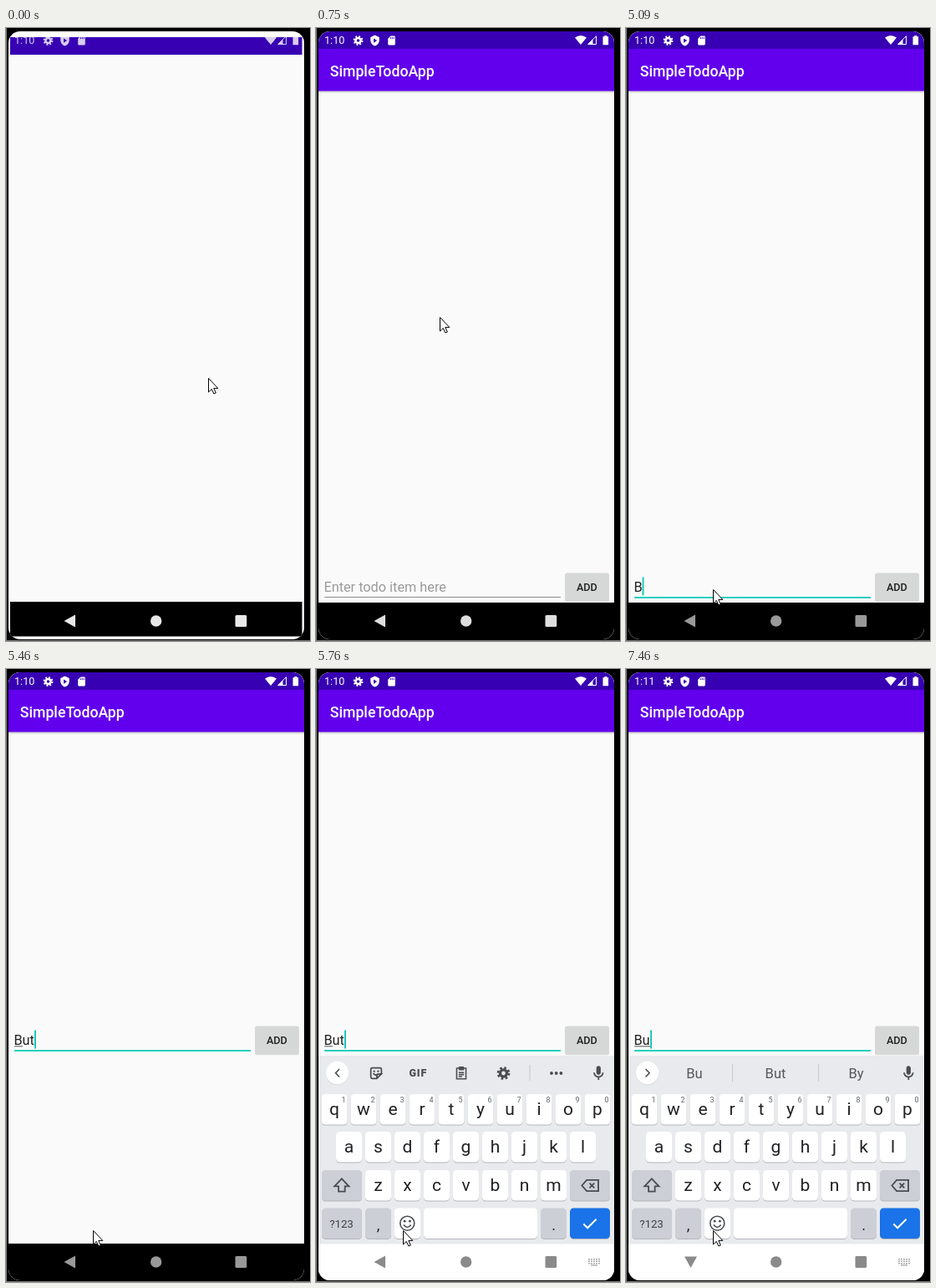
An HTML page that plays this animation: 364x734 px, repeating every 8000 ms.

```html
<!DOCTYPE html>
<html lang="en">
<head>
<meta charset="utf-8">
<title>Todo app</title>
<style>
  html, body { margin: 0; width: 100%; height: 100%; overflow: hidden; background: #000; }
  svg { display: block; width: 364px; height: 734px; }
  text { font-family: Roboto, Arial, sans-serif; white-space: pre; }
</style>
</head>
<body>
<svg id="stage" viewBox="0 0 364 734" xmlns="http://www.w3.org/2000/svg"></svg>
<script>
const LOOP = 8000;
const INK = '#202124', ICON = '#4a4d51', KEY_DARK = '#cccfd5';

const rect = (x, y, w, h, fill, more = '') =>
  `<rect x="${x}" y="${y}" width="${w}" height="${h}" fill="${fill}" ${more}/>`;
const circle = (x, y, r, fill, more = '') =>
  `<circle cx="${x}" cy="${y}" r="${r}" fill="${fill}" ${more}/>`;
const label = (x, y, size, fill, str, more = '') =>
  `<text x="${x}" y="${y}" font-size="${size}" fill="${fill}" ${more}>${str}</text>`;
const mid = 'text-anchor="middle"';
const group = (id, body, more = '') => `<g id="${id}" ${more}>${body}</g>`;
// Icons are drawn on a 24-unit grid centred on x, y.
const icon = (x, y, size, body) =>
  `<g transform="translate(${x - size / 2} ${y - size / 2}) scale(${size / 24})">${body}</g>`;
const line = (d, color, width = 2) =>
  `<path d="${d}" fill="none" stroke="${color}" stroke-width="${width}"/>`;
const shape = (d, fill) => `<path d="${d}" fill="${fill}"/>`;

function gear(x, y, size, color) {
  const tooth = Math.PI * 17 / 16;
  return icon(x, y, size,
    circle(12, 12, 5.4, 'none', `stroke="${color}" stroke-width="4.4"`) +
    circle(12, 12, 8.5, 'none', `stroke="${color}" stroke-width="4" stroke-dasharray="${tooth}"`));
}

function statusBar() {
  return label(10, 19.3, 12.6, '#fff', '1:10', 'id="clock"') +
    gear(50.5, 15, 13.5, '#fff') +
    icon(70.5, 15, 14, shape('M12 1L3 5v6c0 5.6 3.8 10.700 9 12c5.200-1.300 9-6.400 9-12V5z', '#fff') +
      shape('M9.500 7.500v9l7-4.500z', '#3700b3')) +
    icon(90.500, 15, 13, shape('M18 2h-8L4 8v12q0 2 2 2h12q2 0 2-2V4q0-2-2-2z', '#fff') +
      line('M10 4.500v4M13.500 4.500v4M17 4.500v4', '#3700b3', 1.600)) +
    shape('M310 11.500Q317 6.500 324 11.500L317 20Z', '#fff') +
    line('M335.500 9.700V19.500H325.700Z', '#fff', 1) + shape('M331.500 13.500V19.500H325.500Z', '#fff') +
    shape('M343.500 10.300h1.800v-1.300h3v1.300h1.800v9.900h-6.600z', '#fff');
}

function inputRow() {
  return rect(10, 681, 283, 1, '#8c8c8c', 'id="line"') +
    label(9.4, 675, 16.3, '#9a9a9a', 'Enter todo item here', 'id="field"') +
    rect(10, 676.3, 10, 1, '#555', 'id="mark"') +
    rect(20, 657.5, 2, 22, '#1cc9b8', 'id="caret"') +
    rect(298, 653, 53, 34.200, '#000', 'rx="2" opacity=".13"') +
    rect(298.500, 652.500, 52, 33.500, '#d6d7d7', 'rx="2"') +
    label(324.300, 673.500, 12.600, '#202020', 'ADD', mid + ' font-weight="500"');
}

function key(x, y, w, fill = '#fff') {
  return rect(x, y + 1, w, 36.500, '#b4b7bc', 'rx="4.500"') + rect(x, y, w, 36.500, fill, 'rx="4.500"');
}

function letters(str, first, y, digits = '') {
  return [...str].map((ch, i) => {
    const x = first + 35 * i;
    return key(x - 15.5, y, 31) + label(x, y + 24.5, 21, INK, ch, mid) +
      (digits ? label(x + 11, y + 10.3, 9, '#5f6368', digits[i], mid) : '');
  }).join('');
}

function toolbar() {
  return line('M28 479L23.500 483.700L28 488.500', ICON, 1.600) +
    icon(72, 484, 19, line('M20 13V6q0-2-2-2H6q-2 0-2 2v12q0 2 2 2h7l7-7h-4q-3 0-3 3v4M8 12q2 4 5 2', ICON, 2.200) +
      circle(9, 9, 1.500, ICON) + circle(15, 9, 1.500, ICON)) +
    label(122.300, 488, 12.500, ICON, 'GIF', mid + ' font-weight="900" letter-spacing=".800"') +
    icon(174, 484, 19, line('M5 4.500h14v16H5zM8 11h8M8 14h8M8 17h5', ICON) +
      rect(8, 2, 8, 5.500, ICON, 'rx="1"')) +
    gear(224.500, 484, 18, ICON) +
    rect(255.500, 474, 1, 19, '#c6c8cc') +
    [282, 287.700, 293.400].map(x => circle(x, 484, 1.900, ICON)).join('');
}

function suggestions() {
  const word = (x, i) => label(x, 490, 16.5, '#55585c', '', `id="word${i}" ${mid}`);
  return line('M23.500 479L28 483.700L23.500 488.500', ICON, 1.600) +
    rect(127, 473, 1, 21, '#c6c8cc') + rect(230, 473, 1, 21, '#c6c8cc') +
    [82, 179, 275.5].map(word).join('');
}

function keyboard() {
  const mic = shape('M12 14c1.660 0 3-1.340 3-3V5c0-1.660-1.340-3-3-3S9 3.340 9 5v6c0 1.660 1.340 3 3 3z' +
    'M17 11c0 2.760-2.240 5-5 5s-5-2.240-5-5H5c0 3.530 2.610 6.430 6 6.920V21h2v-3.080c3.390-.490 6-3.390 6-6.920z', ICON);
  return rect(3, 463, 354, 275, '#e8eaed') +
    circle(25.500, 484, 14, '#d4d6da') + circle(25.500, 483.500, 13.700, '#fff') +
    group('tools', toolbar()) + group('words', suggestions()) +
    icon(338.300, 484, 21, mic) +
    letters('qwertyuiop', 22, 509, '1234567890') +
    letters('asdfghjkl', 39.500, 554) +
    letters('zxcvbnm', 74.500, 600) +
    key(7, 600, 48, KEY_DARK) +
    icon(30.800, 618.500, 23, line('M12 3.500L3 13H8V19.500H16V13H21Z', ICON, 1.900)) +
    key(304, 600, 48, KEY_DARK) +
    icon(328, 618.500, 23, line('M8 5H22.500V19H8L2 12ZM11.500 9l6 6M17.500 9l-6 6', ICON, 1.900)) +
    key(7, 645.500, 48, KEY_DARK) + label(30.500, 669, 13.300, '#3c4043', '?123', mid) +
    key(59, 645.500, 31, KEY_DARK) + label(74.500, 672, 18, INK, ',', mid) +
    key(94, 645.500, 31) +
    circle(109.300, 663.700, 8.500, 'none', `stroke="${ICON}" stroke-width="1.600"`) +
    circle(106.200, 661.200, 1.400, ICON) + circle(112.400, 661.200, 1.400, ICON) +
    line('M105 665.500Q109.300 671.500 113.600 665.500', ICON, 1.600) +
    key(129, 645.500, 136) +
    key(269, 645.500, 31, KEY_DARK) + label(284.500, 672, 18, INK, '.', mid) +
    key(304, 645.500, 48, '#1a73e8') + icon(328, 664, 23, line('M4 12.500l5 5L20 6.500', '#fff', 2));
}

function navIcons() {
  let dots = '';
  for (let i = 0; i < 15; i++) dots += rect(326 + 3 * (i % 5), 706 + 2.5 * Math.floor(i / 5), 2, 1.5, 'currentColor');
  dots += rect(329, 713.300, 8, 1.300, 'currentColor');
  return `<path id="back" d="M83 702.500V717.500L69.500 710Z"/>` +
    `<circle cx="179.700" cy="710" r="6.700"/>` +
    `<rect x="274.500" y="703" width="13.700" height="14" rx="1.500"/>` + group('hide', dots);
}

document.getElementById('stage').innerHTML =
  `<defs><clipPath id="glass"><rect x="3" y="4" width="354" height="728" rx="14"/></clipPath></defs>` +
  rect(0, 0, 364, 734, '#000') + rect(0, 0, 1, 734, '#777') + rect(0, 733, 364, 1, '#777') +
  group('screen',
    rect(3, 4, 354, 728, '#fff') +
    group('base', rect(3, 4, 354, 728, '#fafafa') + rect(3, 4, 354, 21, '#3700b3') + rect(3, 688, 354, 44, '#000')) +
    group('opening', rect(5, 11, 349.500, 676, '#fafafa') + rect(5, 11, 349.500, 21, '#3700b3') +
      rect(5, 687, 349.500, 41.500, '#000')) +
    group('status', statusBar()) +
    group('app', rect(3, 25, 354, 50.500, '#6200ee') +
      rect(3, 75.500, 354, 1, '#000', 'opacity=".200"') + rect(3, 76.500, 354, 1.500, '#000', 'opacity=".070"') +
      label(16.800, 58, 17.700, '#fff', 'SimpleTodoApp', 'font-weight="500"') +
      group('row', inputRow())) +
    group('keys', keyboard()) +
    rect(3, 688.500, 354, 44, '#fff', 'id="lightNav"') +
    group('nav', navIcons()),
    'clip-path="url(#glass)"') +
  `<path id="pointer" d="M.500 .500V17L4.300 13.400L6.900 19L9.300 18L6.800 12.400H11.800Z" fill="#fff" stroke="#000" stroke-width="1" stroke-linejoin="round"/>`;

const el = {};
document.querySelectorAll('#stage [id]').forEach(n => el[n.id] = n);

// Each track lists [start, ...values]; a value holds until the next start.
const track = {
  pointer: [[0, 242, 419], [300, 182, 405], [450, 180, 409], [600, 166, 380], [750, 148, 346],
    [880, 150, 179], [1030, 120, 330], [1150, 90, 560], [1270, 82, 698], [1420, 117, 647],
    [1570, 116, 646], [1690, 112, 653], [1810, 107, 661], [1970, 104, 672]],
  nav: [[0, '#e8e8e8'], [750, '#dedede'], [880, '#cfcfcf'], [1030, '#bcbcbc'], [1150, '#aaa'],
    [1270, '#999'], [5610, '#bdbdbd'], [5760, '#8a8a8a']],
  text: [[0, ''], [5090, 'B'], [5460, 'But'], [5910, 'But '], [7070, 'But'], [7340, 'Bu']],
  mark: [[0, 0], [5460, 10], [6060, 0], [7190, 24], [7340, 19]],
  words: [[0, '', '', ''], [6060, 'it', 'I', "I'm"], [7190, 'But', 'Buy', 'Bit'], [7460, 'Bu', 'But', 'By']],
  turn: [[0, 0], [5910, -45], [6060, -90]]
};
const caretX = { 'B': 19.5, 'Bu': 29, 'But': 34, 'But ': 38.3 };

function at(name, t) {
  const steps = track[name];
  let i = steps.length - 1;
  while (i && steps[i][0] > t) i--;
  return steps[i].slice(1);
}
const set = (id, attrs) => { for (const k in attrs) el[id].setAttribute(k, attrs[k]); };
const show = (id, on) => set(id, { display: on ? 'inline' : 'none' });

function draw(t) {
  const [text] = at('text', t);
  const [navColor] = at('nav', t);
  const [markWidth] = at('mark', t);
  const [turn] = at('turn', t);
  const rising = t >= 5610 && t < 5760;

  show('opening', t < 150);
  show('base', t >= 150);
  set('status', { opacity: t < 150 ? 0.8 : 1 });
  el.clock.textContent = t < 6490 ? '1:10' : '1:11';
  show('app', t >= 600);
  set('app', { opacity: t < 750 ? 0.6 : 1 });

  set('row', { transform: `translate(0 ${t < 5460 ? 0 : -225})` });
  el.field.textContent = text || 'Enter todo item here';
  set('field', { fill: text ? '#212121' : '#9a9a9a' });
  set('line', text ? { height: 2, fill: '#1fd0be' } : { height: 1, fill: '#8c8c8c' });
  show('caret', text && !(t >= 6640 && t < 7070));
  set('caret', { x: caretX[text] || 0 });
  set('mark', { width: markWidth });

  show('keys', t >= 5610);
  set('keys', { transform: `translate(0 ${rising ? 43 : 0})` });
  show('tools', t < 5910);
  show('words', t >= 5910);
  at('words', t).forEach((w, i) => el['word' + i].textContent = w);

  show('lightNav', t >= 5760);
  set('nav', { fill: navColor, opacity: rising ? 0.8 : 1 });
  set('back', { transform: `rotate(${turn} 77 709.500)` });
  show('hide', t >= 5610);
  set('hide', { color: rising ? '#d5e4fa' : '#aaa' });

  set('pointer', { transform: `translate(${at('pointer', t).join(' ')})` });
}

const start = performance.now();
function tick() {
  draw((performance.now() - start) % LOOP);
  requestAnimationFrame(tick);
}
draw(0);
requestAnimationFrame(tick);
</script>
</body>
</html>
```
